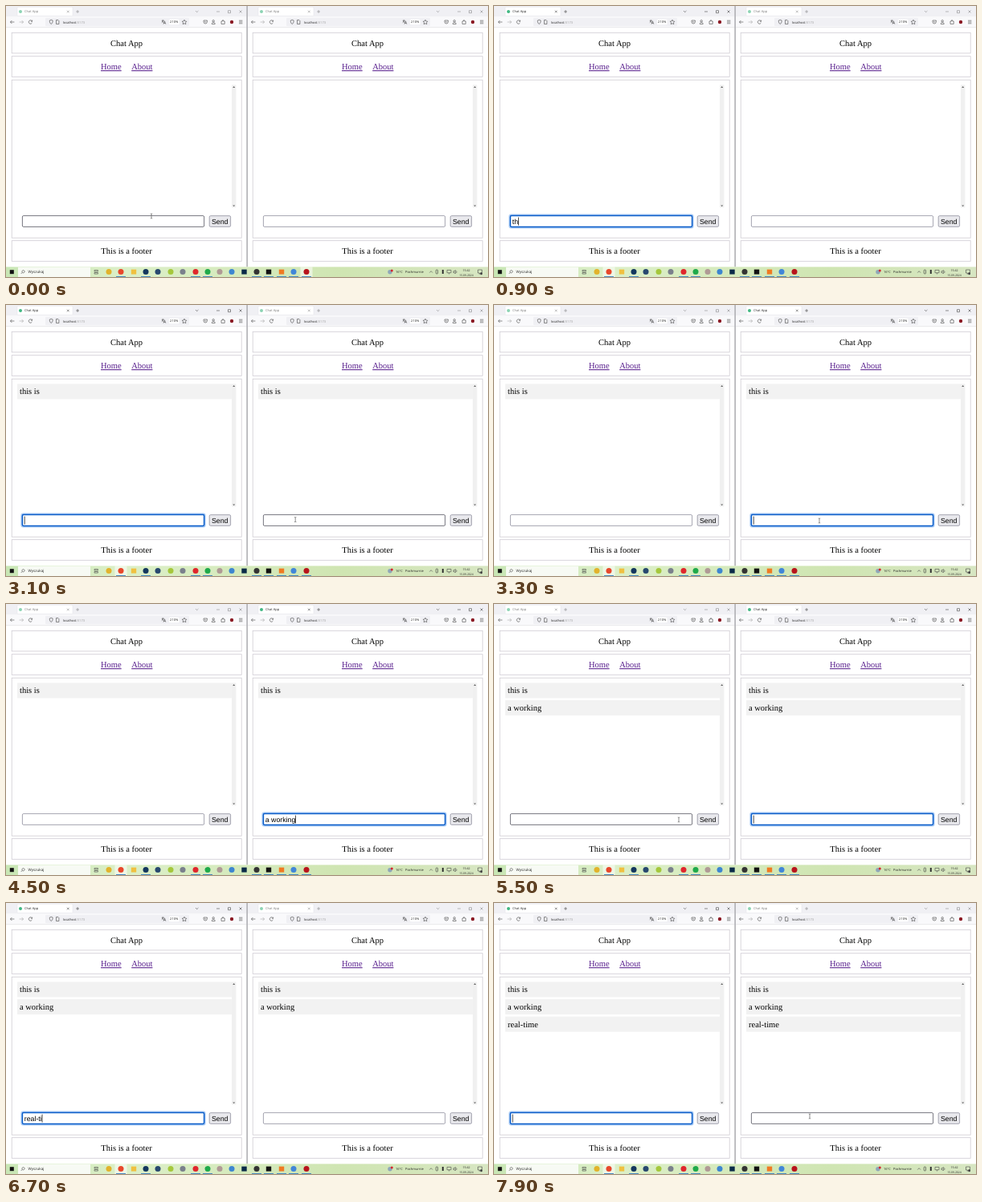
These frames come from a looping animation (600x338 px, 8000 ms). An HTML page:

```html
<!DOCTYPE html>
<html lang="en">
<head>
<meta charset="utf-8">
<title>Chat App</title>
<style>
html, body { margin: 0; width: 100%; height: 100%; overflow: hidden; background: #fff; }
svg { display: block; width: 100vw; height: 100vh; }
text { white-space: pre; text-rendering: geometricPrecision; }
.page { font: 10.5px "Liberation Serif", serif; fill: #000; }
.ctl { font: 8.75px "Liberation Sans", sans-serif; fill: #000; }
.ui { font: 4px "Open Sans", sans-serif; fill: #222; }
.mid { text-anchor: middle; }
.link { fill: #551a8b; text-decoration: underline; text-decoration-thickness: .7px; }
.box { fill: #fff; stroke: #cfcbd3; stroke-width: .8; }
.ico { fill: none; stroke: #444; stroke-width: .6; }
</style>
</head>
<body>
<svg id="stage" viewBox="0 0 600 338" preserveAspectRatio="none"></svg>
<script>
const LOOP = 8000;
const stage = document.getElementById('stage');
const rect = (x, y, w, h, attrs = '') => `<rect x="${x}" y="${y}" width="${w}" height="${h}" ${attrs}/>`;
const dot = (x, y, r, fill) => `<circle cx="${x}" cy="${y}" r="${r}" fill="${fill}"/>`;
const label = (x, y, cls, str, attrs = '') => `<text x="${x}" y="${y}" class="${cls}" ${attrs}>${str}</text>`;
const icon = (d, attrs = '') => `<path class="ico" d="${d}" ${attrs}/>`;

// Browser chrome: tab strip and address bar
const chrome = () => rect(0, 0, 300, 13.5, 'fill="#f0f0f4"') +
  rect(0, 13.5, 300, 13.2, 'fill="#f9f9fb"') +
  rect(0, 26.6, 300, .5, 'fill="#d4d4d8"') +
  rect(14, 1.3, 69, 11.2, 'rx="1.3" fill="#fff" stroke="#dcdce2" stroke-width=".4"') +
  '<g class="title">' +
  dot(18, 7, 2, '#41b883') + label(23, 8.4, 'ui', 'Chat App') +
  icon('M76 5.7l2.6 2.6m0-2.6l-2.6 2.6M87.2 7h3.8M89.1 5.1v3.8M236 6l1.7 1.7L239.4 6M262 7h4M276.5 5.7h3v3h-3zM290.5 5.5l3 3m0-3l-3 3') +
  '</g>' +
  rect(49, 14.7, 179, 10.6, 'rx="1.3" fill="#f0f0f4"') +
  icon('M10.4 20h-5m2-2l-2 2 2 2M32.4 19a2.2 2.2 0 1 0 0 2m.2-3.4v1.6h-1.7M54.3 18l1.9-.7 1.9.7c0 2.6-.5 3.7-1.9 4.5-1.4-.8-1.9-1.9-1.9-4.5zM62.5 17.5h2.4l1 1v4h-3.4z') +
  icon('M16.6 20h5m-2-2l2 2-2 2', 'opacity=".45"') +
  label(71, 21.5, 'ui', 'localhost<tspan fill="#999">:5173</tspan>') +
  icon('M193.8 18.2h3m-1.5-.8v.8c0 1.2-.6 2-1.5 2.5m.5-1.7l2 1.6M196 22.6l1.4-3.8 1.4 3.8m-2.3-1.2h1.8') +
  rect(203, 16.8, 12.5, 6.5, 'rx="1" fill="#fff"') + label(209.2, 21.4, 'ui mid', '210%') +
  icon('M222 17.2l.9 1.8 2 .3-1.4 1.4.3 2-1.8-1-1.8 1 .3-2-1.4-1.4 2-.3z') +
  icon('M246 18h4.4v1.6a2.2 2.4 0 0 1-4.4 0zm1 1.2l1.2 1.1 1.2-1.1M256.2 22.5c0-3 4-3 4 0zm2-2.5a1.2 1.2 0 1 0 0-2.5 1.2 1.2 0 0 0 0 2.5M268 19h1.4v-1.2h1.4V19h1.4v3.4H268zM290 18.2h4.4M290 20h4.4M290 21.8h4.4') +
  dot(281, 20, 2.2, '#8b1a24');

const message = (str, i) => `<g class="msg" visibility="hidden">` +
  rect(14, 98.4 + i * 21.6, 267, 19, 'fill="#f2f2f2"') +
  label(17, 111.4 + i * 21.6, 'page', str) + '</g>';

const pane = x => `<g class="pane" transform="translate(${x} 0)">` +
  rect(0, 0, 300, 326, 'fill="#fff"') + chrome() +
  rect(7.2, 33.3, 286, 25.6, 'class="box"') + label(150, 49.6, 'page mid', 'Chat App') +
  rect(7.2, 62.7, 286, 25.6, 'class="box"') +
  label(118, 79.2, 'page link', 'Home') + label(156.2, 79.2, 'page link', 'About') +
  rect(7.2, 92.2, 286, 197, 'class="box"') +
  ['this is', 'a working', 'real-time'].map(message).join('') +
  rect(281, 98.4, 5.4, 153, 'fill="#f0f0f0"') +
  '<path fill="#666" d="M282.2 102l1.5-1.9 1.5 1.9zM282.2 248.4l1.5 1.9 1.5-1.9z"/>' +
  rect(18.4, 259.6, 230.2, 17.8, 'class="glow" rx="3" fill="#a9cbf5"') +
  rect(20.4, 261.6, 226.2, 13.8, 'class="field" rx="1.4" fill="#fff"') +
  label(22.8, 271.6, 'ctl entry', '') +
  rect(22.8, 263.6, .7, 10, 'class="caret" fill="#000"') +
  rect(253.2, 261.7, 26.4, 13.6, 'rx="1.5" fill="#e9e9ed" stroke="#8f8f9d" stroke-width=".8"') +
  label(266.2, 271.7, 'ctl mid', 'Send') +
  rect(7.2, 292.7, 286, 25.6, 'class="box"') + label(150, 309.2, 'page mid', 'This is a footer') +
  '</g>';

const apps = [
  [128, '#e2b32c'], [143, '#e8472b', 1], [159, '#f0c040', 0, 1], [174, '#14375e', 1],
  [189, '#27486f'], [205, '#a5c83c'], [220, '#7a808c'], [236, '#e0262c', 1],
  [251, '#1faa4a', 1], [266, '#b09a96'], [281, '#3d86d0'], [296.5, '#0a2a48', 0, 1],
  [312, '#333', 1], [327, '#111', 1, 1], [343, '#f07a22', 1, 1], [358, '#4186d8', 1], [374, '#b8141c', 1]
];

const taskbar = () =>
  '<linearGradient id="bar"><stop stop-color="#c8e6b4"/><stop offset=".25" stop-color="#dcefc8"/><stop offset=".7" stop-color="#cfe5b2"/><stop offset="1" stop-color="#d7e6c2"/></linearGradient>' +
  rect(0, 325.4, 600, 12.6, 'fill="url(#bar)"') +
  rect(4.8, 329.2, 5, 5, 'fill="#111"') +
  rect(15, 325.8, 90, 12.2, 'fill="#f7faf4"') +
  icon('M22.6 330a1.6 1.6 0 1 0 0 2.4 1.6 1.6 0 0 0 0-2.4m-2.2 2.2l-1.7 1.8M110 329.5h4.4v1.6H110zM110 332.5h4.4v1.6H110z') +
  label(27.5, 333.4, 'ui', 'Wyszukaj', 'style="font-size:4.6px"') +
  rect(136, 325.4, 15, 12.6, 'id="hot" fill="#fff" opacity=".55"') +
  apps.map(([x, color, open, square]) =>
    (square ? rect(x - 3.2, 328.6, 6.4, 6, `fill="${color}"`) : dot(x, 331.6, 3.5, color)) +
    (open ? rect(x - 6, 337.1, 12, .9, 'fill="#3a7fbf"') : '')).join('') +
  dot(478, 331.8, 2.7, '#8fa6b8') + dot(480.3, 330, 1.5, '#d5282f') +
  label(485, 333.2, 'ui', '16°C') + label(497, 333.2, 'ui', 'Pochmurnie') +
  icon('M527.2 332.6l1.9-1.9 1.9 1.9M549 329.4h5v3.4h-5zM551.5 332.8v1.7M557 330.8h1l1.3-1.3v4.4L558 332.6h-1zM560.5 330.4q1 1.3 0 2.6M587.5 329h5v4h-2l-1.2 1.4V333h-1.8z') +
  rect(535.2, 329, 2.3, 5, 'rx="1" fill="none" stroke="#333" stroke-width=".6"') +
  rect(542.8, 329, 2, 5, 'fill="#333"') +
  label(573, 330.6, 'ui mid', '15:42', 'style="font-size:3.6px"') +
  label(573, 336.5, 'ui mid', '15.09.2024', 'style="font-size:3.4px"') + dot(591.6, 333.8, 1.5, '#444');

stage.innerHTML = pane(0) + pane(300) + rect(299.3, 0, 1.7, 325.4, 'fill="#b4b4b8"') + taskbar() +
  '<path id="beam" fill="none" stroke="#444" stroke-width=".6" d="M-1.2-3q1.2 0 1.2.7V2.3q0 .7-1.2.7M1.2-3Q0-3 0-2.3M0 2.3q0 .7 1.2.7"/>' +
  '<path id="arrow" fill="#fff" stroke="#000" stroke-width=".4" d="M0 0v5.4l1.3-1.2.9 2 .8-.4-.9-1.9h1.8z"/>';

const panes = [...stage.querySelectorAll('.pane')].map(el => {
  const pick = name => el.querySelector('.' + name);
  return { title: pick('title'), glow: pick('glow'), field: pick('field'), entry: pick('entry'),
    caret: pick('caret'), msgs: [...el.querySelectorAll('.msg')] };
});
const [hot, beam, arrow] = ['hot', 'beam', 'arrow'].map(id => document.getElementById(id));

// [time, text] typed in each pane
const typed = [
  [[0, ''], [700, 't'], [900, 'th'], [1200, 'thi'], [1500, 'this'], [1600, 'this '], [1700, 'this i'], [1800, 'this is'], [2100, ''],
   [6000, 'r'], [6100, 're'], [6500, 'real'], [6600, 'real-'], [6700, 'real-ti'], [6800, 'real-tim'], [6900, 'real-time'], [7100, '']],
  [[0, ''], ...[...'a working'].map((_, i) => [3700 + i * 100, 'a working'.slice(0, i + 1)]), [4600, '']]
];
const sent = [2100, 4600, 7100];
const focusAt = [[0, -1], [200, 0], [3200, 1], [5700, 0]];
const caretOff = [[2300, 2700], [4800, 5200], [7400, 7700]];
const pointerOff = [[700, 2700], [3700, 5200], [6000, 7300]];
const route = [[0, 181, 262], [2700, 181, 262], [3200, 405, 269], [5200, 405, 269], [5500, 230, 269],
  [5700, 200, 268], [7300, 200, 268], [7500, 308, 267], [7700, 345, 267], [7900, 393, 266]];

const latest = (list, t) => list.filter(e => e[0] <= t).pop()[1];
const within = (spans, t) => spans.some(([a, b]) => t >= a && t < b);
const show = (el, on) => el.setAttribute('visibility', on ? 'visible' : 'hidden');

function pointer(t) {
  const i = route.findIndex(p => p[0] > t);
  if (i < 0) return route[route.length - 1].slice(1);
  const [t0, x0, y0] = route[i - 1], [t1, x1, y1] = route[i];
  const k = (t - t0) / (t1 - t0);
  return [x0 + (x1 - x0) * k, y0 + (y1 - y0) * k];
}

function draw(t) {
  const focus = latest(focusAt, t);
  const [x, y] = pointer(t);
  const visible = !within(pointerOff, t);
  let over = -1;
  panes.forEach((p, i) => {
    const active = focus === i;
    const local = x - i * 300;
    const hover = visible && local > 20 && local < 247;
    if (hover) over = i;
    p.title.setAttribute('opacity', active ? 1 : .6);
    show(p.glow, active);
    p.field.setAttribute('stroke', active ? '#0a5cc8' : hover ? '#555560' : '#8f8f9d');
    p.field.setAttribute('stroke-width', active ? 1.5 : .8);
    p.entry.textContent = latest(typed[i], t);
    p.caret.setAttribute('x', 22.8 + p.entry.getComputedTextLength());
    show(p.caret, active && !within(caretOff, t));
    p.msgs.forEach((m, j) => show(m, t >= sent[j]));
  });
  hot.setAttribute('x', focus < 0 ? 366.5 : 135.5);
  for (const el of [beam, arrow]) el.setAttribute('transform', `translate(${x} ${y})`);
  show(beam, visible && over >= 0);
  show(arrow, visible && over < 0);
}

function frame() {
  draw(Math.floor(performance.now() % LOOP / 100) * 100);
  requestAnimationFrame(frame);
}
frame();
</script>
</body>
</html>
```
